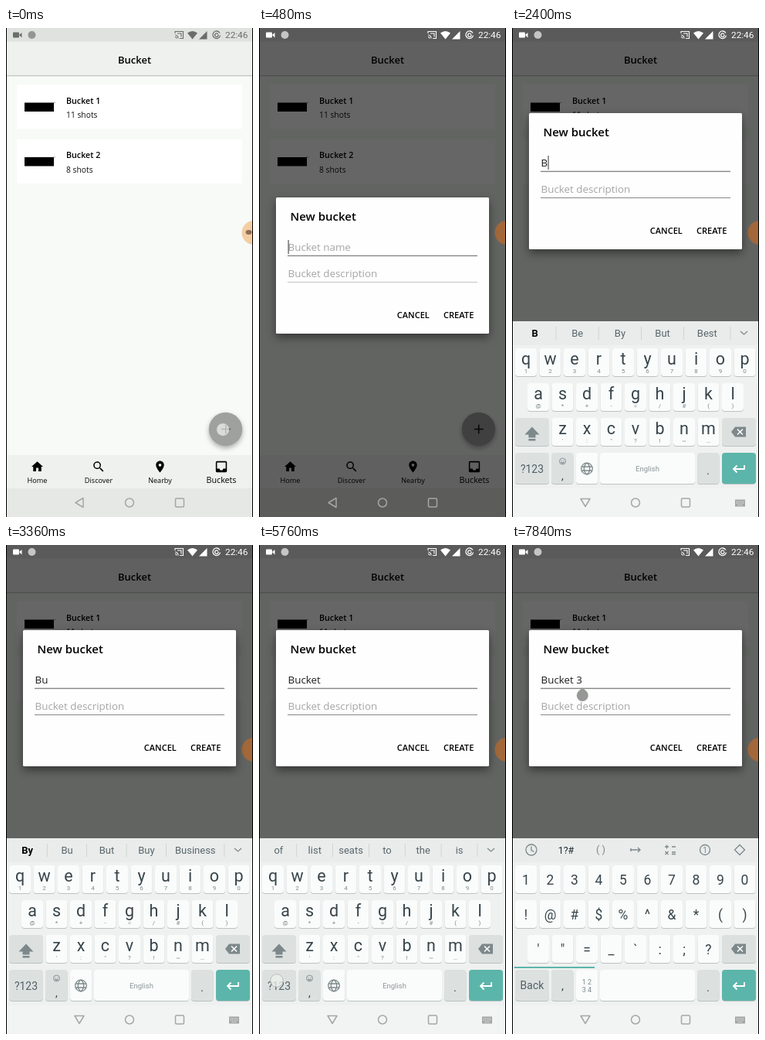
An HTML page that plays this animation: 320x632 px, repeating every 8 s.

```html
<!DOCTYPE html>
<html lang="en">
<head>
<meta charset="utf-8">
<title>New bucket</title>
<style>
  html, body { margin: 0; width: 100%; height: 100%; overflow: hidden; background: #000; }
  svg { display: block; width: 100vw; height: 100vh; }
  text { font-family: "Open Sans", "Noto Sans", sans-serif; white-space: pre; }
  .ui text, text.ui { font-family: Roboto, "Noto Sans", sans-serif; }
  .mid { text-anchor: middle; }
  .bold { font-weight: 600; }
  .line { fill: none; stroke: #7d888b; stroke-width: 1.3; }
  #dialog > rect:first-child { filter: drop-shadow(0 5px 6px rgba(0, 0, 0, .45)); }
  #fab { filter: drop-shadow(0 3px 3px rgba(0, 0, 0, .3)); }
  .key { filter: drop-shadow(0 1px .4px rgba(70, 85, 90, .3)); }
</style>
</head>
<body>
<svg id="stage" viewBox="0 0 320 632" preserveAspectRatio="none"></svg>
<script>
const LOOP = 8000, PRESS = 160;
const DARK = '#37454b', SOFT = '#7d888b';
const stage = document.getElementById('stage');

const esc = s => s.replace(/&/g, '&amp;').replace(/</g, '&lt;');
const rect = (x, y, w, h, fill, more = '') =>
  `<rect x="${x}" y="${y}" width="${w}" height="${h}" fill="${fill}" ${more}/>`;
const circle = (x, y, r, fill, more = '') =>
  `<circle cx="${x}" cy="${y}" r="${r}" fill="${fill}" ${more}/>`;
const text = (x, y, s, size, fill = '#000', more = '') =>
  `<text x="${x}" y="${y}" font-size="${size}" fill="${fill}" ${more}>${esc(s)}</text>`;
const mid = (x, y, s, size, fill, more = '') => text(x, y, s, size, fill, `class="mid ${more}"`);
const path = (d, more = 'class="line"') => `<path d="${d}" ${more}/>`;
const group = (id, body, more = '') => `<g id="${id}" ${more}>${body}</g>`;

// App screen
const card = (y, name, shots) =>
  rect(14, y, 292, 57.5, '#fff') + rect(24, y + 23.5, 38, 11.5, '#000') +
  rect(61, y + 23, 3, .8, '#888') +
  text(78, y + 24.5, name, 10.7, '#000', 'class="bold"') + text(78, y + 43, shots, 10.3, '#111');

const tab = (x, label, size, d, scale = .75) =>
  path(d, `transform="translate(${x - 12 * scale} ${567 - 12 * scale}) scale(${scale})" fill-rule="evenodd"`) +
  mid(x, 587.5, label, size);

const app =
  rect(1, 0, 318, 632, '#f7faf7') +
  rect(1, 60, 318, 3, 'url(#fade)') +
  rect(1, 17, 318, 44, '#eff1ee') + rect(1, 0, 318, 17.5, '#e0e2df') +
  mid(166.5, 45.5, 'Bucket', 13, '#000', 'bold') +
  card(73, 'Bucket 1', '11 shots') + card(143.5, 'Bucket 2', '8 shots') +
  group('fab', circle(284.5, 518.5, 21.7, '#9fa19f')) +
  path('M279 518.5h11.5M284.7 512.7v11.5', 'stroke="#111" stroke-width="1.6"') +
  rect(1, 552, 318, 44, '#eff1ee') + rect(1, 595, 318, 37, '#e6e8e5') +
  tab(40.5, 'Home', 9.2, 'M10 20v-6h4v6h5v-8h3L12 3 2 12h3v8z') +
  tab(120, 'Discover', 9.1, 'M15.5 14h-.8l-.3-.3A6.5 6.5 0 1 0 13.7 14.4l.3.3v.8l5 5L20.5 19zm-6 0a4.5 4.5 0 1 1 0-9 4.5 4.5 0 0 1 0 9z') +
  tab(199.5, 'Nearby', 9.1, 'M12 2C8.1 2 5 5.1 5 9c0 5.3 7 13 7 13s7-7.700 7-13c0-3.900-3.100-7-7-7zm0 9.500a2.500 2.500 0 0 1 0-5 2.500 2.500 0 0 1 0 5z') +
  tab(279, 'Buckets', 10.7, 'M19 3H5a2 2 0 0 0-2 2v14a2 2 0 0 0 2 2h14a2 2 0 0 0 2-2V5a2 2 0 0 0-2-2zm0 12h-4a3 3 0 0 1-6 0H5V5h14z', .8);

const status =
  rect(9, 5.5, 8, 7, 'currentColor', 'rx="1"') + path('M17 9l3.500-3v6.500z', 'fill="currentColor"') +
  circle(33.5, 9, 5, 'currentColor', 'opacity=".65"') +
  path('M219 7V4.500h10.500v9H225M219 9a4 4 0 0 1 4 4.500M219 11.500a2 2 0 0 1 2 2M222 7h5v4.500', 'fill="none" stroke="currentColor" stroke-width="1.1"') +
  path('M235 6.500Q241.500 1.500 248 6.500L241.500 14.500z', 'fill="currentColor"') +
  path('M250 14.500L260.500 4v10.500z', 'fill="currentColor"') +
  path('M277 6.500a4.800 4.800 0 1 0 .5 3M275 9a2.200 2.200 0 1 1-.1-.5', 'fill="none" stroke="currentColor" stroke-width="1.3"') +
  text(284, 13.3, '22:46', 11.8, 'currentColor', 'class="ui"');

// Dialog, drawn from its own top edge
const dialog =
  rect(22, 0, 276, 176, '#fdfefd', 'rx="1.5"') +
  text(40.5, 29.5, 'New bucket', 15, '#000', 'class="bold"') +
  `<text id="hint" x="37.5" y="68.500" font-size="13.400" fill="#a4a6a4">Bucket name</text>` +
  `<text id="typed" x="37.5" y="69" font-size="13.400" fill="#1c1e1c"></text>` +
  rect(37, 74.7, 246, 1.4, '#868886') +
  text(37.5, 103, 'Bucket description', 13.4, '#a4a6a4') +
  `<rect id="line2" x="37" y="109" width="246" height="1"/>` +
  text(178.8, 156, 'CANCEL', 11, '#000', 'class="bold"') +
  text(239, 156, 'CREATE', 11.1, '#000', 'class="bold"') +
  `<rect id="caret" y="55" width="1.200" height="18" fill="#555"/>` +
  path('M91.300 74.500l5.200 4.500a7.500 7.500 0 1 1-10.400 0z', 'id="handle" fill="#969896"');

// Keyboard
const STEP = 31.5;
const ROWS = [
  { y: 414, x: 18, keys: 'qwertyuiop', hints: '1234567890' },
  { y: 459, x: 34, keys: 'asdfghjkl', hints: '@*+-=/#()' },
  { y: 504, x: 65.5, keys: 'zxcvbnm', hints: '\':"?!~…' }
];
const SIGNS = [
  { y: 414, x: 18, keys: '1234567890' },
  { y: 459, x: 18, keys: '!@#$%^&*()' },
  { y: 504, x: 34, keys: '\'"=_`:;?' }
];
const eachKey = (rows, draw) => rows.map(r =>
  [...r.keys].map((k, i) => draw(k, r.x + i * STEP, r.y, r.hints && r.hints[i])).join('')).join('');
const findKey = k => {
  for (const r of [...ROWS, ...SIGNS]) {
    const i = r.keys.indexOf(k);
    if (i >= 0) return [r.x + i * STEP, r.y];
  }
};
const cap = (x, y, w, h = 36, fill = '#fafcfb') => rect(x, y, w, h, fill, 'rx="4" class="key"');
const letters = upper => eachKey(ROWS, (k, x, y, hint) =>
  cap(x - 14, y, 28) + mid(x, y + 21, upper ? k.toUpperCase() : k, upper ? 19 : 21.5, DARK) +
  mid(x, y + 31.5, hint, 8, SOFT));
const signs = eachKey(SIGNS, (k, x, y) => cap(x - 14, y, 28) + mid(x, y + 25, k, 17.5, DARK));

const GREY = '#dce1e0';
const baseKeys =
  cap(272, 504, 44, 36, GREY) +
  path('M284 522l5-6.500h14v13h-14z', `fill="${SOFT}"`) + path('M292 518.500l7 7m0-7l-7 7', 'stroke="#fff" stroke-width="1.500"') +
  cap(4, 549, 44, 40, GREY) + cap(51, 549, 28.5, 40, GREY) + cap(83, 549, 28.5, 40) +
  cap(114, 549, 123, 40) + cap(240, 549, 28.5, 40, GREY) + cap(272, 549, 44, 40, '#5cb5aa') +
  mid(254, 577, '.', 15, DARK) +
  path('M301 565v5h-14m4.500-4.500l-4.500 4.500 4.500 4.500', 'fill="none" stroke="#fff" stroke-width="1.800"');
const alphaKeys =
  cap(4, 504, 44, 36, GREY) +
  path('M26 515.500l9.500 10h-5v4h-9v-4h-5zM21.500 531h9v2.500h-9z', `fill="${SOFT}"`) +
  mid(26, 575, '?123', 14, '#536066') + mid(65.5, 584, ',', 14, DARK) +
  circle(65.5, 560, 4, 'none', 'class="line" style="stroke-width:.9"') +
  path('M63.500 561q2 2.500 4 0M64 558.700v.8m3-.8v.8') +
  circle(97, 569.5, 7.3, 'none', 'class="line"') +
  path('M97 562c-5 4-5 11 0 15c5-4 5-11 0-15M90.500 567h13M90.500 572h13') +
  mid(175.5, 573, 'English', 9.5, '#8b9598');
const signKeys =
  rect(3, 545, 104, 2, '#5cb5aa') +
  mid(26, 574, 'Back', 14, '#536066') + mid(65.5, 575, ',', 15, DARK) +
  mid(97, 568, '1 2', 9, SOFT) + mid(97, 578, '3 4', 9, SOFT);

const tools =
  circle(11, 394, 8, '#fafcfb') + path('M9 390l4 4-4 4') +
  `<text x="61" y="400" font-size="16" fill="#8b9598" class="mid" style="font-family:'Noto Sans CJK SC','Noto Sans CJK',sans-serif">中</text>` +
  mid(121, 399, 'En', 15, DARK) + path('M131 402h3v-3z', `fill="${DARK}"`) +
  rect(293, 388, 4.4, 8, SOFT, 'rx="2.200"') + path('M290.500 393a4.700 4.700 0 0 0 9.400 0M295.200 398v3');
const signTools =
  circle(25, 394, 7, 'none', 'class="line"') + path('M25 389.500v5l3.500 2') +
  mid(70, 398.5, '1?#', 12.5, '#1f2b30') + mid(115, 398, '( )', 13, SOFT) +
  path('M153 394h13m-3-3l3 3-3 3M154 392v4') +
  path('M198 390h5m-2.500-2.500v5M207 390h5M198.500 396l4 4m0-4l-4 4M207 397h5m-5 2.500h5') +
  circle(250, 394, 6.5, 'none', 'class="line"') + mid(250, 398, '1', 10, SOFT) +
  path('M295 387.500l6.500 6.500-6.500 6.500-6.500-6.500z');

const keyboard =
  rect(1, 379, 318, 274, '#eef1f0') + rect(1, 379, 318, 31, '#e9eceb') +
  group('strip', '') + baseKeys +
  group('alpha', alphaKeys) + group('lower', letters(false)) + group('upper', letters(true)) +
  group('signs', signs + signKeys) +
  rect(1, 595, 318, 58, '#f1f4f2') +
  path('M289 609.500h13v9h-13z', 'fill="#a2a5a3"') +
  path('M290.500 612h10m-10 2.200h10m-8 2.300h6', 'stroke="#f1f4f2" stroke-width=".9" stroke-dasharray="1.400 .8"');

const nav = path('M100 607.500v12l-10-6z', 'id="back" class="nav"') +
  circle(160, 613.5, 5.5, 'none') + rect(219.5, 608, 11, 11, 'none', 'rx="1.500"');

stage.innerHTML =
  `<defs><linearGradient id="fade" x2="0" y2="1"><stop stop-color="#8f918f"/><stop offset="1" stop-color="#f7faf7"/></linearGradient></defs>` +
  app + rect(1, 0, 318, 632, '#000', 'id="scrim"') +
  group('status', status) +
  `<circle id="bubble" cx="321" cy="264.500" r="15.500"/>` +
  `<ellipse id="dot" cx="314.500" cy="264" rx="4" ry="3" fill="#8d6d54"/>` +
  group('dialog', dialog) + group('keyboard', keyboard, 'class="ui"') +
  group('nav', nav, 'fill="none" stroke="#a5a7a5" stroke-width="1.500" stroke-linejoin="round"') +
  group('popup', rect(-15.5, -54, 31, 91, '#d9dedd', 'rx="2" class="key"') +
    `<text id="popupText" class="mid" y="-25" font-size="21.500" fill="${DARK}"></text>`, 'class="ui"') +
  `<circle id="touch" r="8.300" fill="#eef0ee" fill-opacity=".75" stroke="#a0a3a1" stroke-opacity=".6"/>` +
  rect(0, 0, 1, 632, '#000') + rect(319, 0, 1, 632, '#000');

const el = {};
stage.querySelectorAll('[id]').forEach(e => el[e.id] = e);

// Presses: start time, then a key or a point
const keyTap = (t, key, shown = key) => {
  const [x, y] = findKey(key);
  return { t, x: x + 3, y: y + 24, key: shown, kx: x, ky: y };
};
const TAPS = [
  { t: 0, x: 281, y: 519 }, { t: 1840, x: 26, y: 523 },
  keyTap(2240, 'b', 'B'), keyTap(2640, 'u'), keyTap(3440, 'c'), keyTap(3840, 'k'),
  keyTap(4240, 'e'), keyTap(4600, 't'), { t: 5040, x: 178, y: 571, key: ' ' },
  { t: 5680, x: 23, y: 563 }, keyTap(6400, '3'), { t: 7160, x: 92, y: 175 }
];
const WORDS = {
  B: 'B Be By But Best', Bu: 'By Bu But Buy Business', Buc: 'Buck Buc Bucks Bucket Buckle',
  Buck: 'Buck Bucks Bucket Buckle Bucked', Bucke: 'Bucket Bucke Buckets Bucks Buckle',
  Bucket: 'Bucket Buckets Bucked Bucks Buckle', 'Bucket ': 'of list seats to the is'
};

// Cells share the strip evenly, long words take a little more
function suggestions(typed) {
  const words = WORDS[typed].split(' ');
  const free = words.length < 6;
  const weight = w => free ? 48 + Math.max(0, w.length - 3) * 4.5 : 46.5;
  const total = words.reduce((sum, w) => sum + weight(w), 0);
  let x = 2, out = path('M296 392l4.500 4 4.500-4');
  words.forEach((w, i) => {
    const width = weight(w) * 281 / total;
    out += mid(x + width / 2, 398.5, w, 13, free && !i ? '#000' : '#5a666b', free && !i ? 'bold' : '');
    x += width;
    out += rect(x - .5, 386, .8, 17, '#c9cfcd');
  });
  return out;
}

const show = (e, on) => { e.style.display = on ? '' : 'none'; };
const clamp = v => Math.max(0, Math.min(1, v));
let stripNow;

function draw(t) {
  const done = TAPS.filter(p => t >= p.t + PRESS);
  const typed = done.map(p => p.key || '').join('');
  const tap = TAPS.find(p => t >= p.t && t < p.t + PRESS);

  // Scrim and dialog fade in, then the keyboard pushes the dialog up
  const dim = clamp((t - 160) / 240);
  const left = 1 - clamp((t - 1080) / 300);
  el.scrim.setAttribute('opacity', .6 * dim);
  el.status.setAttribute('color', dim > .4 ? '#fff' : '#6b6d6b');
  el.bubble.setAttribute('fill', dim > .4 ? '#a3683a' : '#f4cda3');
  show(el.dot, dim <= .4);
  el.dialog.setAttribute('opacity', clamp((t - 220) / 180));
  el.dialog.setAttribute('transform', `translate(0 ${110 + 109 * left ** 2.1})`);
  el.keyboard.setAttribute('opacity', 1 - left ** 2.4);
  el.keyboard.setAttribute('transform', `translate(0 ${108 * left ** 3})`);
  show(el.keyboard, left < 1);
  el.back.setAttribute('transform', left < 1 ? 'rotate(-90 95 613.5)' : '');

  // Field
  el.typed.textContent = typed;
  show(el.hint, !typed);
  el.line2.setAttribute('fill', left ? '#c4c6c4' : '#868886');
  const wake = Math.max(400, t >= 1080 ? 1080 : 0, ...done.slice(1).map(p => p.t + PRESS));
  show(el.caret, t >= 400 && (t - wake) % 1000 < 500);
  el.caret.setAttribute('x', 37.5 + (typed ? el.typed.getComputedTextLength() + .3 : 0));
  show(el.handle, t >= 7160 + PRESS);

  // Key layers
  const symbols = t >= 5680 + PRESS;
  const shifted = t >= 2000 && t < 2400;
  show(el.alpha, !symbols);
  show(el.lower, !symbols && !shifted);
  show(el.upper, shifted);
  show(el.signs, symbols);
  const strip = symbols ? 'signs' : typed;
  if (strip !== stripNow) {
    stripNow = strip;
    el.strip.innerHTML = symbols ? signTools : typed ? suggestions(typed) : tools;
  }

  // Finger
  show(el.touch, tap);
  show(el.popup, tap && tap.kx);
  if (tap) {
    el.touch.setAttribute('cx', tap.x);
    el.touch.setAttribute('cy', tap.y);
    if (tap.kx) {
      el.popup.setAttribute('transform', `translate(${tap.kx} ${tap.ky})`);
      el.popupText.textContent = tap.key;
    }
  }
}

const start = performance.now();
function tick() {
  draw((performance.now() - start) % LOOP);
  requestAnimationFrame(tick);
}
tick();
</script>
</body>
</html>
```
